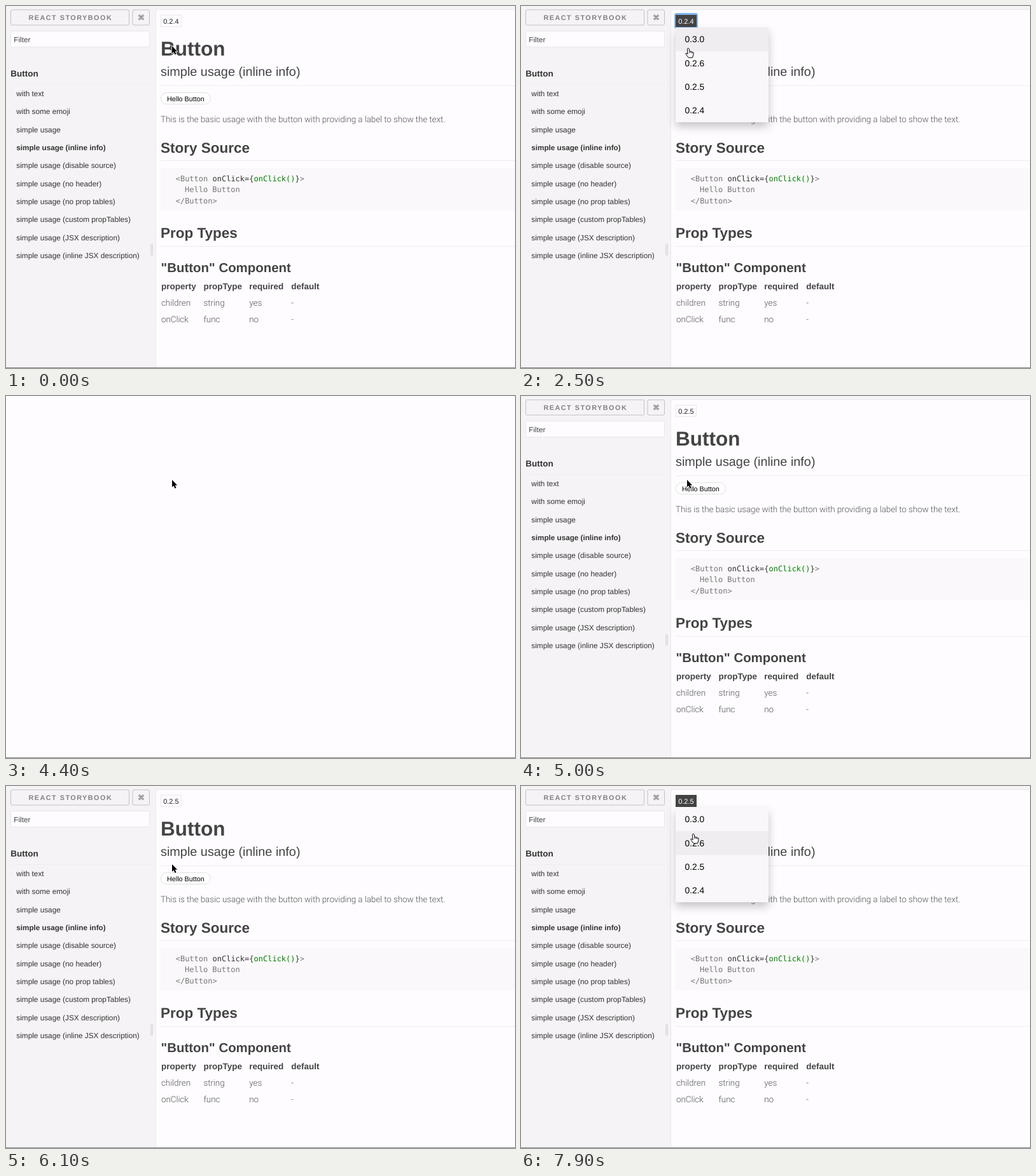
An HTML page for the animation above (8 s loop, 800 by 570 pixels).

```html
<!DOCTYPE html>
<html lang="en">
<head>
<meta charset="utf-8">
<title>Story browser</title>
<style>
  html, body { margin: 0; width: 100%; height: 100%; overflow: hidden; background: #fefcff; }
  svg { display: block; }
  text { font-family: "Liberation Sans", Arial, sans-serif; fill: #333; white-space: pre; text-rendering: geometricPrecision; }
  .bold { font-weight: 700; }
  .head { font-weight: 700; fill: #444; }
  .sub { fill: #444; }
  .black { fill: #000; }
  .brand { font-weight: 700; fill: #828282; letter-spacing: 1.5px; }
  .icon { font-family: "DejaVu Sans", sans-serif; fill: #666; }
  .light { font-family: Roboto, sans-serif; font-weight: 300; fill: #555; letter-spacing: -.1px; }
  .code { font-family: "DejaVu Sans Mono", monospace; fill: #777; }
  .dark { fill: #333; }
  .green { fill: #008000; }
  .rule { stroke: #eeecee; }
  .field { fill: #fefcff; stroke: #e9e7e9; }
  .key { fill: none; stroke: #c3c1c3; }
  #list { filter: drop-shadow(0 7px 7px rgba(0, 0, 0, .22)); }
</style>
</head>
<body>
<svg id="stage" width="800" height="570" viewBox="0 0 800 570"></svg>
<script>
const text = (x, y, size, cls, str) => `<text x="${x}" y="${y}" font-size="${size}" class="${cls}">${str}</text>`;
const rect = (x, y, w, h, attrs) => `<rect x="${x}" y="${y}" width="${w}" height="${h}" ${attrs}/>`;
const rule = (x1, x2, y) => `<path class="rule" d="M${x1} ${y}H${x2}"/>`;

const stories = ['with text', 'with some emoji', ...['', ' (inline info)', ' (disable source)', ' (no header)',
  ' (no prop tables)', ' (custom propTables)', ' (JSX description)', ' (inline JSX description)'].map(s => 'simple usage' + s)];
const versions = ['0.3.0', '0.2.6', '0.2.5', '0.2.4'];
const table = [['property', 'propType', 'required', 'default'], ['children', 'string', 'yes', '-'], ['onClick', 'func', 'no', '-']];
const columns = [244, 310.5, 382.3, 448.3];
const menuTop = 34, itemHeight = 37.3;

const frame = rect(0, 0, 800, 570, 'fill="#f5f3f5"')
  + rect(235.5, 5.5, 580, 590, 'rx="4" fill="#fefcff" stroke="#ebe9eb"')
  + rect(7.5, 6, 186, 24, 'rx="2" class="key"') + text(35.5, 21.7, 10.8, 'brand', 'REACT STORYBOOK')
  + rect(199, 6, 26.5, 24, 'rx="2" class="key"') + text(207, 21.7, 11, 'icon', '⌘')
  + rect(7.5, 39.5, 218, 25, 'rx="2" class="field"') + text(12.3, 56.5, 11.7, 'sub', 'Filter')
  + rect(227.5, 375.5, 3, 17, 'rx="1" fill="#e6e4e6" stroke="#dddbdd"');

const nav = text(7.3, 111, 13.5, 'bold', 'Button') + rule(8, 226, 123.5)
  + stories.map((s, i) => text(16.3, 142 + i * 28.33, i === 3 ? 11.7 : 11.8, i === 3 ? 'bold' : '', s)).join('');

const page = text(243, 77.5, 31.5, 'head', 'Button')
  + text(243, 109.5, 19.85, 'sub', 'simple usage (inline info)') + rule(243, 800, 125.5)
  + rect(243.5, 136.5, 78, 18, 'rx="9" fill="#fff" stroke="#e2e0e2"') + text(253, 149.6, 10.8, 'black', 'Hello Button')
  + text(243, 183.3, 13.5, 'light', 'This is the basic usage with the button with providing a label to show the text.')
  + text(243, 231, 22.5, 'head', 'Story Source') + rule(243, 800, 243.5)
  + rect(243, 255, 557, 67, 'fill="#faf8fa"')
  + text(266.7, 276, 12, 'code', '&lt;Button <tspan class="dark">onClick={<tspan class="green">onClick()</tspan>}</tspan>&gt;')
  + text(281, 293.4, 12, 'code', 'Hello Button') + text(266.7, 310.7, 12, 'code', '&lt;/Button&gt;')
  + text(243, 365.3, 22.5, 'head', 'Prop Types') + rule(243, 800, 378.5)
  + text(243.5, 419, 20.45, 'head', '"Button" Component')
  + table.map((row, r) => row.map((cell, c) =>
      text(columns[c], 446.3 + r * 25.6, 13.5, r ? 'light' : 'head', cell)).join('')).join('');

const menu = `<g id="list">${rect(243, menuTop, 146, 149, 'fill="#f9f7f9"')}</g>`
  + rect(243, 0, 146, itemHeight, 'id="hover" fill="#efedef"')
  + versions.map((v, i) => text(257.5, 57.4 + i * itemHeight, 13.8, 'black', v)).join('');

const arrow = 'M0 0V11.6L2.6 9.2 4.5 13.6 6.5 12.7 4.7 8.5H8.2Z';
const hand = 'M-1.5 1.2C-1.5-.4 1-.4 1.2 1.2L2 5.2C3 4.4 4.2 4.8 4.4 5.6 5.4 5 6.4 5.4 6.6 6.4 7.6 6 8.4 6.8 8.3 8'
  + 'L7.6 11.5 6.5 14.8H.2L-3.6 9.8C-5 7.8-3.3 7-2 8.2L-1 9.3ZM2 5.2V7.5M4.4 5.6V7.8M6.6 6.4V8';

const $ = id => document.getElementById(id);
$('stage').innerHTML = `<g id="frame">${frame}</g><g id="nav">${nav}${page}`
  + rect(242.5, 12.5, 34, 22, 'id="ring" rx="2" fill="none" stroke="#82b4ea" stroke-width="3"')
  + rect(243.5, 14.5, 32, 18, 'id="badge"') + text(247.2, 27.6, 11, '', '<tspan id="version"></tspan>')
  + `<g id="menu">${menu}</g></g>` + rect(0, 569, 800, 1, 'fill="#858385"')
  + `<g id="cursor"><path id="arrow" d="${arrow}" stroke="#fff" stroke-width="1.4" paint-order="stroke"/>`
  + `<path id="hand" d="${hand}" fill="#fff" stroke="#000" stroke-linejoin="round"/></g>`;

// Cursor path: time, x, y
const path = [[0, 261, 63], [900, 262, 34], [1000, 263, 26], [1400, 264, 24.5], [1900, 264, 24.5], [3600, 260.5, 171.5],
  [3900, 260.5, 171.5], [4200, 261, 132], [5900, 261, 132], [7000, 261, 33], [7100, 266, 27.5], [7200, 266, 27.5], [7900, 271, 75.5]];

function cursorAt(t) {
  const next = path.findIndex(p => p[0] > t);
  if (next < 0) return path[path.length - 1].slice(1);
  const [t0, x0, y0] = path[next - 1], [t1, x1, y1] = path[next];
  const u = (t - t0) / (t1 - t0), k = u * u * (3 - 2 * u);
  return [x0 + (x1 - x0) * k, y0 + (y1 - y0) * k];
}

const show = (id, on) => $(id).style.display = on ? '' : 'none';

function draw(now) {
  const t = Math.floor(now % 8000 / 100) * 100;
  const [x, y] = cursorAt(t);
  const open = t >= 1000 && t < 4300 || t >= 7100;
  const item = Math.floor((y - menuTop) / itemHeight);
  show('frame', t < 4300 || t >= 4700);
  show('nav', t < 4300 || t >= 5000);
  show('menu', open);
  show('ring', t >= 1300 && t < 4300);
  show('hover', item >= 0);
  show('hand', open);
  show('arrow', !open);
  $('hover').setAttribute('y', menuTop + item * itemHeight);
  $('badge').style.cssText = open ? 'fill:#444;stroke:#444' : 'fill:#fefcff;stroke:#e9e7e9';
  $('version').style.fill = open ? '#fff' : '#222';
  $('version').textContent = t < 4300 ? '0.2.4' : '0.2.5';
  $('cursor').setAttribute('transform', `translate(${x} ${y})`);
  requestAnimationFrame(draw);
}
requestAnimationFrame(draw);
</script>
</body>
</html>
```
